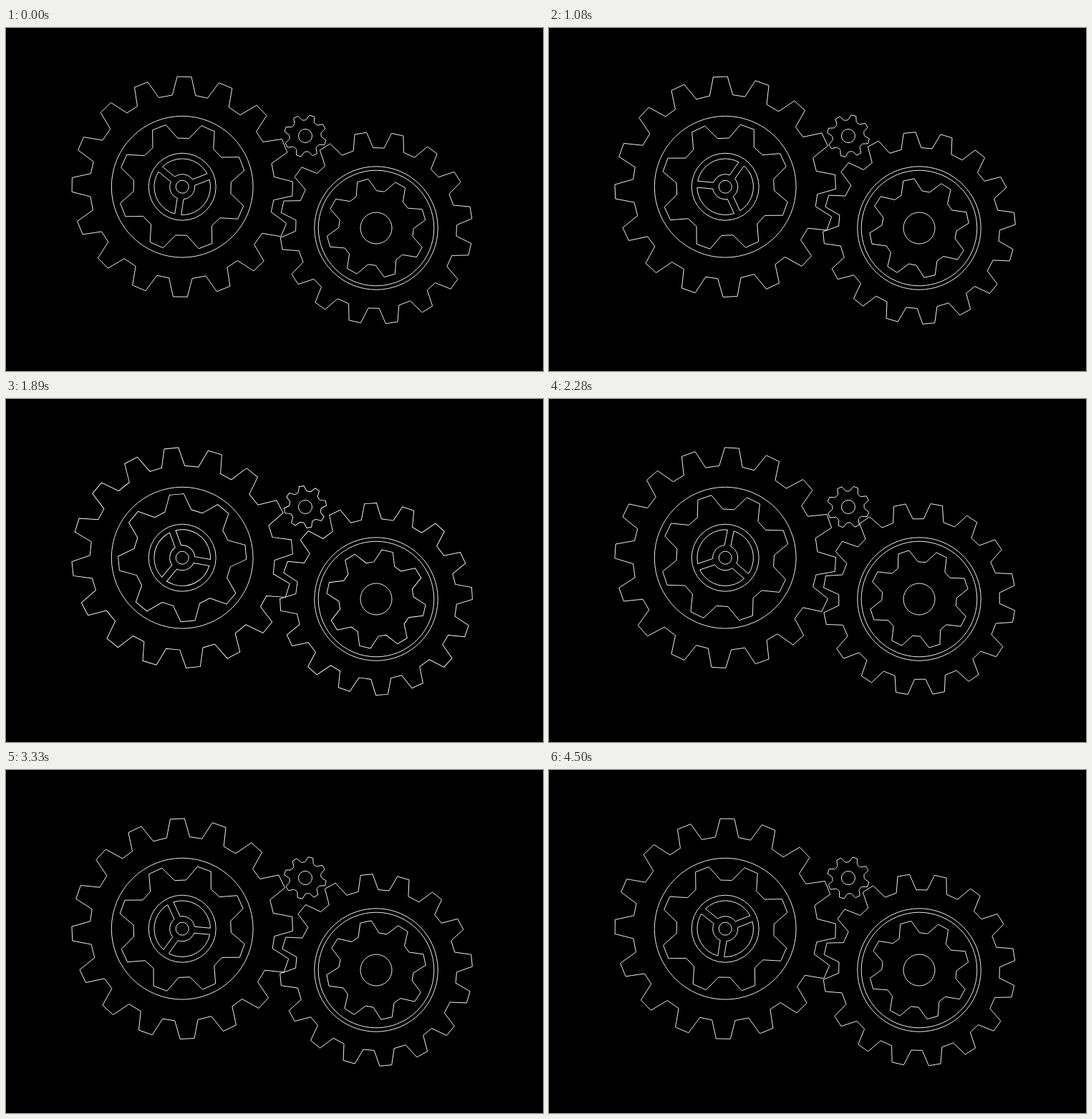
An HTML page with a canvas that plays this animation: 750x480 px, repeating every 9950 ms.

```html
<!DOCTYPE html>
<html lang="en">
<head>
<meta charset="utf-8">
<title>Gears</title>
<style>
  html, body { margin: 0; width: 100%; height: 100%; overflow: hidden; background: #000; }
  canvas { display: block; }
</style>
</head>
<body>
<canvas id="stage" width="750" height="480"></canvas>
<script>
const ctx = document.getElementById('stage').getContext('2d');
const LOOP = 9950, TURN = 4500, STEP = 30;
const rad = degrees => degrees * Math.PI / 180;

// Angles run clockwise in degrees, with 0 pointing up.
const polar = (r, angle) => [r * Math.sin(rad(angle)), -r * Math.cos(rad(angle))];

function circle(r) {
  ctx.beginPath();
  ctx.arc(0, 0, r, 0, 2 * Math.PI);
  ctx.stroke();
}

// Every second tooth is turned by "stagger"; "fillet" rounds the valleys.
function gear({ teeth, tip, tipHalf, root, rootHalf, angle, stagger = 0, fillet = 0 }) {
  const middle = i => angle + i * 360 / teeth + i % 2 * stagger;
  ctx.beginPath();
  for (let i = 0; i < teeth; i++) {
    const mid = middle(i), next = middle(i + 1);
    const valleyStart = polar(root, mid + rootHalf);
    const valleyEnd = polar(root, next - rootHalf);
    ctx.lineTo(...polar(tip, mid - tipHalf));
    ctx.lineTo(...polar(tip, mid + tipHalf));
    ctx.arcTo(...valleyStart, ...valleyEnd, fillet);
    ctx.arcTo(...valleyEnd, ...polar(tip, next - tipHalf), fillet);
  }
  ctx.closePath();
  ctx.stroke();
}

// Three openings separated by straight spokes of constant width.
function spokes({ inner, outer, half, angle }) {
  const a = Math.asin(half / inner), b = Math.asin(half / outer), third = rad(120);
  for (let i = 0; i < 3; i++) {
    const start = rad(angle + i * 120 - 90);
    ctx.beginPath();
    ctx.arc(0, 0, outer, start + b, start + third - b);
    ctx.arc(0, 0, inner, start + third - a, start + a, true);
    ctx.closePath();
    ctx.stroke();
  }
}

const wheels = [
  {
    x: 246.2, y: 222.2, direction: 1, circles: [98.9, 47, 9],
    gears: [
      { teeth: 16, tip: 154.3, tipHalf: 3.7, root: 129, rootHalf: 7.2, angle: 1.05, stagger: -0.45 },
      { teeth: 8, tip: 89.6, tipHalf: 6.4, root: 68.4, rootHalf: 15.8, angle: 23.75 }
    ],
    spokes: { inner: 17.5, outer: 39.3, half: 4.5, angle: 68.8 }
  },
  {
    x: 517, y: 280, direction: -1, circles: [86.2, 80.8, 22],
    gears: [
      { teeth: 16, tip: 134.4, tipHalf: 3.6, root: 112.5, rootHalf: 7.15, angle: 12.8, stagger: 0.4 },
      { teeth: 8, tip: 69.5, tipHalf: 6.5, root: 52.2, rootHalf: 16.5, angle: 29.25 }
    ]
  },
  {
    x: 418, y: 151, direction: 1, circles: [9.5],
    gears: [
      { teeth: 8, tip: 29.6, tipHalf: 6.6, root: 22.3, rootHalf: 15.5, angle: 18.3, fillet: 2 }
    ]
  }
];

function draw(time) {
  ctx.fillStyle = '#000';
  ctx.fillRect(0, 0, 750, 480);
  ctx.strokeStyle = '#fff';
  ctx.lineWidth = 0.92;
  for (const wheel of wheels) {
    ctx.save();
    ctx.translate(wheel.x, wheel.y);
    wheel.circles.forEach(circle);
    ctx.rotate(wheel.direction * 2 * Math.PI * time / TURN);
    wheel.gears.forEach(gear);
    if (wheel.spokes) spokes(wheel.spokes);
    ctx.restore();
  }
}

// One full turn in steps, then a rest until the loop ends.
function tick() {
  const elapsed = performance.now() % LOOP;
  draw(Math.min(Math.floor(elapsed / STEP) * STEP, TURN));
  requestAnimationFrame(tick);
}
tick();
</script>
</body>
</html>
```
